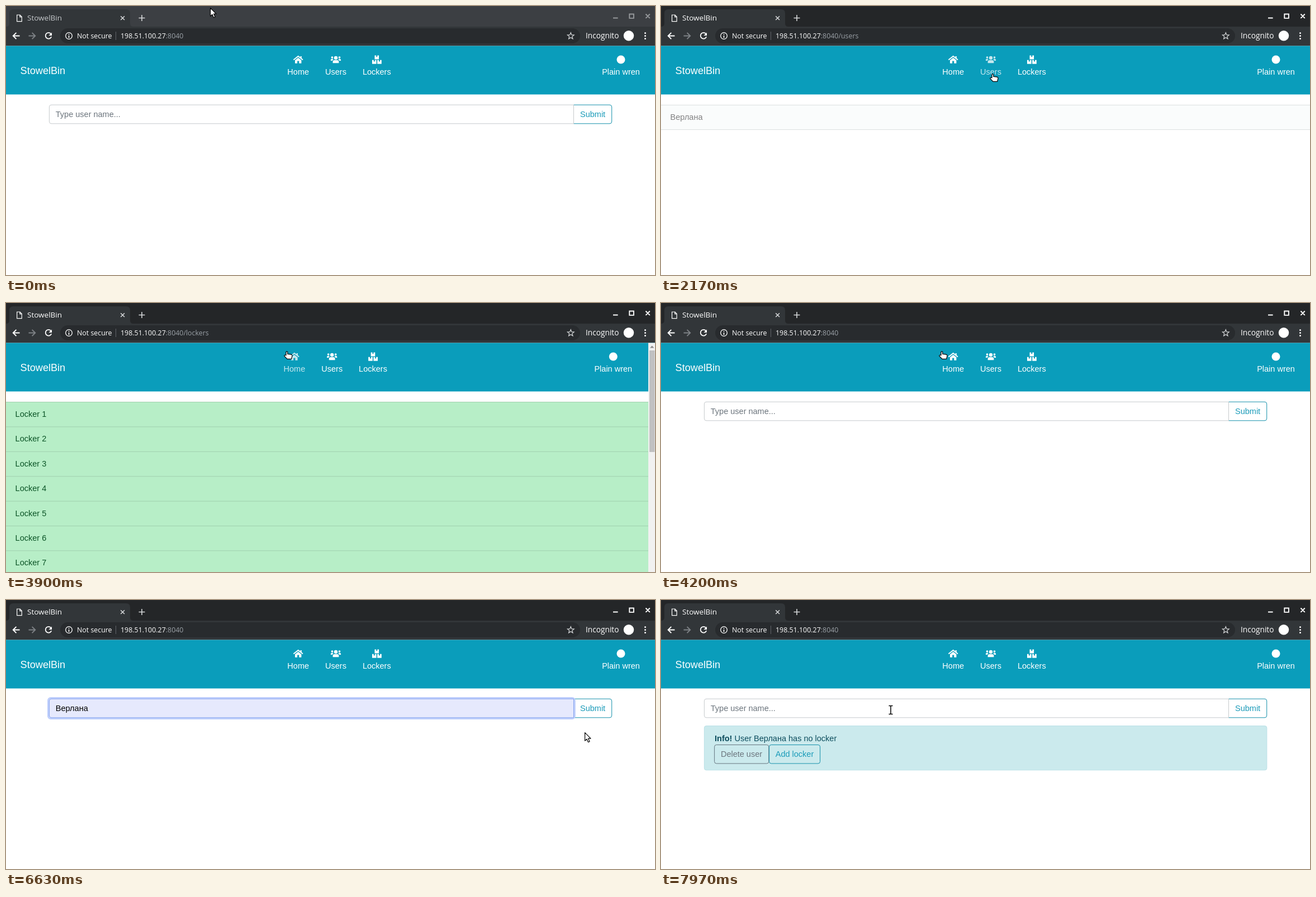
Recreate the animation shown at these times as an HTML page. Size 1161 by 482 pixels, loop 8 s.

```html
<!DOCTYPE html>
<html lang="en">
<head>
<meta charset="utf-8">
<title>StowelBin</title>
<style>
html, body { margin: 0; width: 1161px; height: 482px; overflow: hidden; background: #fff; }
svg { display: block; }
text { font: 14.51px "Liberation Sans", Arial, sans-serif; white-space: pre; }
.ui { font: 12.4px "Open Sans", "Noto Sans", sans-serif; }
.big { font-size: 13.5px; }
.mid { text-anchor: middle; }
.line { fill: none; stroke: #fff; stroke-width: 1.6; }
#menu text { font: 600 14.3px "Open Sans", "Noto Sans", sans-serif; fill: #25282b; }
</style>
</head>
<body>
<svg id="stage" width="1161" height="482" viewBox="0 0 1161 482">
  <defs>
    <linearGradient id="fade">
      <stop stop-color="#323639" stop-opacity="0"/><stop offset="1" stop-color="#323639"/>
    </linearGradient>
    <filter id="shadow" x="-5%" y="-5%" width="110%" height="112%">
      <feDropShadow dx="0" dy="1" stdDeviation="1.5" flood-opacity=".35"/>
    </filter>
    <path id="box" d="M0 0h2.8v2.7h2V0h2.8v7H0z"/>
  </defs>

  <!-- browser window -->
  <rect id="frame" width="1161" height="40"/>
  <path d="M0 37Q6 37 6 31V13Q6 6 13 6H215Q222 6 222 13V31Q222 37 228 37H1161V71.5H0z" fill="#323639"/>
  <g id="tabIdle">
    <path class="line" style="stroke-width:1.2" d="M19.6 16H25L28.2 19.3V27.6H19.6zM24.8 16V19.6H28.2"/>
    <text id="title" class="ui big" x="38" y="26">StowelBin</text>
    <path class="line" style="stroke-width:1.8" d="M80.6 50.2A5.4 5.4 0 1 0 81.2 55"/>
    <path d="M82 47.5V53H76.5z" fill="#fff"/>
  </g>
  <g id="tabBusy">
    <path class="line" d="M20 19.5Q21.5 16.7 24.5 16"/>
    <svg x="38" width="158" height="37"><text id="busyTitle" class="ui big" y="26" fill="#fff"></text></svg>
    <rect x="170" y="10" width="27" height="24" fill="url(#fade)"/>
    <path class="line" style="stroke-width:1.9" d="M71.2 48.7l9.6 9.6m0-9.6l-9.6 9.6"/>
  </g>
  <path class="line" style="stroke:#d5d7d9" d="M205.2 18.2l6.8 6.8m0-6.8l-6.8 6.8M237.5 21.5h11M243 16v11"/>
  <g id="controls"><path class="line" style="stroke:inherit;stroke-width:1.9" d="M1086 21.5h8.6M1115.3 14.5h7.6v7.4h-7.6zM1144.4 14.5l7.4 7.4m0-7.4l-7.4 7.4"/></g>
  <path class="line" style="stroke-width:1.9" d="M24.5 53.5H13M18.4 47.8L12.7 53.5L18.4 59.2"/>
  <path class="line" style="stroke:#7d8185;stroke-width:1.9" d="M40.5 53.5H52M46.6 47.8L52.3 53.5L46.6 59.2"/>
  <rect x="97" y="40" width="930" height="27" rx="13.5" fill="#282b2e"/>
  <circle class="line" style="stroke-width:1.3" cx="112.5" cy="53.5" r="5.8"/>
  <path class="line" d="M112.5 50v1.6m0 1.3v4.3"/>
  <text class="ui" x="127" y="58" fill="#fff">Not secure</text>
  <path d="M196.5 46v15" stroke="#5f6368"/>
  <text class="ui" x="205" y="58" fill="#fff"><tspan id="host"></tspan><tspan id="path" fill="#9aa0a6"></tspan></text>
  <path id="star" class="line" style="stroke:#d5d7d9;stroke-width:1.2"/>
  <text class="ui" style="font-size:13.7px" x="1037" y="58" fill="#fff">Incognito</text>
  <circle cx="1114" cy="53.3" r="9.2" fill="#fff"/>
  <path d="M1143.5 48.6v0m0 5v0m0 5v0" stroke="#fff" stroke-width="3" stroke-linecap="round"/>

  <!-- navigation bar -->
  <rect y="71.5" width="1161" height="87" fill="#0a9dbb"/>
  <g fill="#fff">
    <text x="25.6" y="121.5" style="font-size:18.14px">StowelBin</text>
    <g id="links">
      <g id="home">
        <g transform="translate(522.7 96)">
          <path class="line" style="stroke-width:1.9" d="M-8.3 .6L0 -6L8.3 .6"/>
          <path d="M3.8-6h2.3v4h-2.3zM-5.7 1.3L0-3.2L5.7 1.3V6.7H1.6V2.5H-1.6V6.7H-5.7z"/>
        </g>
        <text class="mid" x="522.7" y="123">Home</text>
      </g>
      <g id="users">
        <g transform="translate(590 96)">
          <circle cy="-3" r="3.2"/><circle cx="-6.5" cy="-3.9" r="1.9"/><circle cx="6.5" cy="-3.9" r="1.9"/>
          <path d="M-5.4 6.2V4Q-5.4 1-2.2 1H2.2Q5.4 1 5.4 4V6.2zM-9.1 1.9V.8Q-9.1-1.2-7-1.2H-5.4L-4.2-.5Q-5.7.5-6 1.9zM9.1 1.9V.8Q9.1-1.2 7-1.2H5.4L4.2-.5Q5.7.5 6 1.9z"/>
        </g>
        <text class="mid" x="590" y="123">Users</text>
      </g>
      <g id="lockers">
        <use href="#box" x="659.5" y="88.6"/><use href="#box" x="655" y="96.7"/><use href="#box" x="664.2" y="96.7"/>
        <text class="mid" x="663.3" y="123">Lockers</text>
      </g>
    </g>
    <g id="account">
      <circle cx="1100" cy="96" r="7.5"/>
      <text class="mid" x="1100" y="123">Plain wren</text>
    </g>
  </g>

  <g id="homePage">
    <g fill="#fff" stroke="#1590ab">
      <path d="M1015.5 177.2H1080Q1083.7 177.2 1083.7 181V207Q1083.7 210.8 1080 210.8H1015.5z"/>
    </g>
    <text class="mid" x="1049.6" y="198.7" fill="#1a9bb9">Submit</text>
    <g id="submitHot">
      <path d="M1015 176.7H1080Q1084.2 176.7 1084.2 181V207Q1084.2 211.3 1080 211.3H1015z" fill="#0a9dbb"/>
      <text class="mid" x="1049.6" y="198.7" fill="#fff">Submit</text>
    </g>
    <rect id="submitRing" x="1014" y="175.3" width="71.6" height="37.4" rx="5" fill="none" stroke="#0a9dbb" stroke-opacity=".5" stroke-width="2.8"/>
    <rect id="ring" x="75.6" y="175.6" width="941.6" height="36.8" rx="4.5" fill="none" stroke="#bfcffc" stroke-width="3.2"/>
    <path id="field" d="M1015.5 177.2H81Q77.4 177.2 77.4 181V207Q77.4 210.8 81 210.8H1015.5z"/>
    <text id="hint" x="88.8" y="198.7" fill="#6c757d">Type user name...</text>
    <text id="preview" class="ui" x="88.8" y="198.5"></text>
    <text id="typed" x="88.8" y="198.7"></text>
    <path id="caret" d="M89.3 186.5v15.5" stroke="#333"/>
    <g id="menu"></g>
    <g id="result">
      <rect x="77.4" y="225.6" width="1006.4" height="79.2" rx="3.6" fill="#cbeaed" stroke="#b9e0e6"/>
      <text x="96" y="253" fill="#0c4d5d"><tspan font-weight="700">Info!</tspan> User <tspan id="who"></tspan> has no locker</text>
      <g fill="none"><rect x="95.6" y="259.5" width="97.2" height="33.5" rx="3.6" stroke="#66757f"/>
      <rect x="193.6" y="259.5" width="91" height="33.5" rx="3.6" stroke="#1590ab"/></g>
      <text class="mid" x="144" y="281" fill="#6c757d">Delete user</text>
      <text class="mid" x="239" y="281" fill="#1a9bb9">Add locker</text>
    </g>
  </g>

  <g id="usersPage">
    <rect y="177" width="1161" height="45" fill="#fafcfc"/>
    <path d="M0 177.5H1161M0 221.5H1161" stroke="#dcdfdf"/>
    <text id="member" x="16.6" y="204" fill="#818182"></text>
  </g>

  <g id="lockersPage">
    <g id="rows"></g>
    <rect x="1149" y="71.5" width="12" height="411" fill="#f1f1f1"/>
    <rect x="1151" y="85" width="9.5" height="182" fill="#c1c1c1"/>
    <path d="M1152 80.5h7.4l-3.7-4z" fill="#8a8a8a"/>
  </g>

  <g id="cursor" fill="#fff" stroke="#000" stroke-width="1.2" stroke-linejoin="round">
    <path id="arrow" d="M.6 .6V15.2L4 12.2L6.5 17.7L9 16.6L6.6 11.2H11z"/>
    <path id="hand" d="M4 7.8V1.6Q5.4 0 6.8 1.6V5.4L13 6.2Q15 6.6 15 8.6L13.6 14.4H6L.8 8.8Q1.2 6.4 4 7.8z"/>
    <path id="beam" stroke-width="1.5" d="M-3.5-7.5H-1Q0-7.5 0-6.5V6.5Q0 7.5-1 7.5H-3.5M3.5-7.5H1Q0-7.5 0-6.5M0 6.5Q0 7.5 1 7.5H3.5" fill="none"/>
  </g>
</svg>
<script>
const LOOP = 8000, HOST = '198.51.100.27', PORT = ':8040', NAME = 'Верлана';
const $ = id => document.getElementById(id);
const set = (id, key, value) => $(id).setAttribute(key, value);
const show = (id, on) => set(id, 'opacity', Number(on));
const within = (t, a, b) => t >= a && t < b;
const ramp = (t, a, b) => Math.min(1, Math.max(0, (t - a) / (b - a)));

// time, x, y and the pointer shape from then on
const track = [
  [0, 365, 3, 'arrow'], [300, 365, 3, 'arrow'], [480, 132, 75, 'arrow'], [760, 1000, 164, 'arrow'],
  [1030, 640, 135, 'arrow'], [1130, 640, 135, 'arrow'], [1300, 588, 122, 'hand'], [1500, 588, 122, 'hand'],
  [1730, 557, 118, 'arrow'], [2000, 557, 118, 'arrow'], [2080, 572, 120, 'hand'], [2150, 588, 121, 'hand'],
  [2230, 588, 121, 'hand'], [2480, 660, 128, 'hand'], [2620, 681, 129, 'hand'], [2770, 669, 126, 'hand'],
  [3230, 669, 126, 'hand'], [3560, 590, 110, 'hand'], [3900, 497, 86, 'hand'], [4370, 497, 86, 'hand'],
  [4450, 440, 108, 'arrow'], [4660, 270, 180, 'beam'], [4780, 236, 196, 'beam'], [4880, 231, 199, 'arrow'],
  [5310, 231, 199, 'arrow'], [5330, 231, 199, 'arrow'], [5400, 231, 199, 'arrow'], [5630, 142, 233, 'arrow'],
  [6230, 142, 233, 'arrow'], [6430, 560, 273, 'arrow'], [6630, 1035, 237, 'arrow'], [6700, 1035, 237, 'arrow'],
  [6760, 1050, 208, 'hand'], [6830, 1058, 195, 'hand'], [7530, 1058, 195, 'hand'], [7570, 990, 192, 'beam'],
  [7630, 885, 188, 'beam'], [7770, 885, 188, 'arrow'], [7850, 640, 153, 'arrow'], [7910, 480, 185, 'beam'],
  [7960, 411, 197, 'beam'], [LOOP, 411, 197, 'beam']
];

function build() {
  $('typed').textContent = $('preview').textContent = $('who').textContent = $('member').textContent = NAME;
  $('host').textContent = HOST;
  let star = '';
  for (let i = 0; i < 10; i++) {
    const r = i % 2 ? 2.7 : 6.2, a = i * Math.PI / 5;
    star += (i ? 'L' : 'M') + (1010.3 + r * Math.sin(a)) + ' ' + (53.8 - r * Math.cos(a));
  }
  set('star', 'd', star + 'z');

  const names = [NAME, 'Vemo', 'Corilde', 'гуртожиток РВС ім. Олеся Талорського', 'Ilu', '4'];
  $('menu').innerHTML = '<rect x="77" y="212" width="316" height="210" rx="3" fill="#fff" filter="url(#shadow)"/>' +
    '<rect id="pick" x="77" y="219.5" width="316" height="32.5" fill="#ececed"/>' +
    names.map((n, i) => `<text x="88" y="${241 + i * 32.65}">${n}</text>`).join('');

  let rows = '';
  for (let i = 0; i < 7; i++) {
    const y = 177 + i * 44.4;
    rows += `<rect y="${y}" width="1149" height="45" fill="#b7eec7"/>` +
      `<path d="M0 ${y + .5}H1149" stroke="#a0d0ae"/><text x="16.6" y="${y + 27}" fill="#0b5426">Locker ${i + 1}</text>`;
  }
  $('rows').innerHTML = rows;
}

function moveCursor(t) {
  const i = track.findIndex(k => k[0] > t), a = track[i - 1], b = track[i];
  const p = ramp(t, a[0], b[0]);
  set('cursor', 'transform', `translate(${a[1] + (b[1] - a[1]) * p} ${a[2] + (b[2] - a[2]) * p})`);
  for (const shape of ['arrow', 'hand', 'beam']) show(shape, shape === a[3]);
}

function draw(t) {
  const page = within(t, 1500, 2900) ? 'users' : within(t, 2900, 4150) ? 'lockers' : 'home';
  const path = PORT + (page === 'home' ? '' : '/' + page);
  const active = t >= 1180;
  const busy = within(t, 1500, 1650) || within(t, 2900, 3230) || within(t, 4150, 4190) || within(t, 7120, 7260);

  set('frame', 'fill', active ? '#242628' : '#3c3f43');
  set('title', 'fill', active ? '#fff' : '#c6c9cc');
  set('controls', 'stroke', active ? '#fff' : '#96999c');
  show('tabIdle', !busy);
  show('tabBusy', busy);
  $('path').textContent = path;
  $('busyTitle').textContent = HOST + path;

  for (const p of ['home', 'users', 'lockers']) show(p + 'Page', p === page);
  set('links', 'transform', `translate(${page === 'lockers' ? -6.8 : 0})`);
  set('account', 'transform', `translate(${page === 'lockers' ? -13.7 : 0})`);
  const hover = (id, on) => set(id, 'opacity', on ? .76 : 1);
  hover('home', within(t, 3800, 4150));
  hover('users', within(t, 1250, 1600) || within(t, 2080, 2330));
  hover('lockers', within(t, 2430, 2900));

  const focus = within(t, 4780, 7080), preview = within(t, 5500, 5860), typed = within(t, 5860, 7160);
  show('ring', focus);
  set('field', 'stroke', focus ? '#86a3ee' : '#c6cacd');
  set('field', 'fill', preview || typed ? '#e6e9fd' : '#fff');
  show('hint', !preview && !typed);
  show('preview', preview);
  show('typed', typed);
  show('caret', focus && !preview && !typed);
  set('menu', 'opacity', ramp(t, 4830, 4950) * (1 - ramp(t, 5860, 6060)));
  show('pick', t >= 5500);
  set('submitHot', 'opacity', ramp(t, 6710, 6830) * (1 - ramp(t, 7560, 7790)));
  show('submitRing', within(t, 7080, 7160));
  show('result', t >= 7160);
  moveCursor(t);
}

build();
const start = performance.now();
(function tick() {
  draw((performance.now() - start) % LOOP);
  requestAnimationFrame(tick);
})();
</script>
</body>
</html>
```
